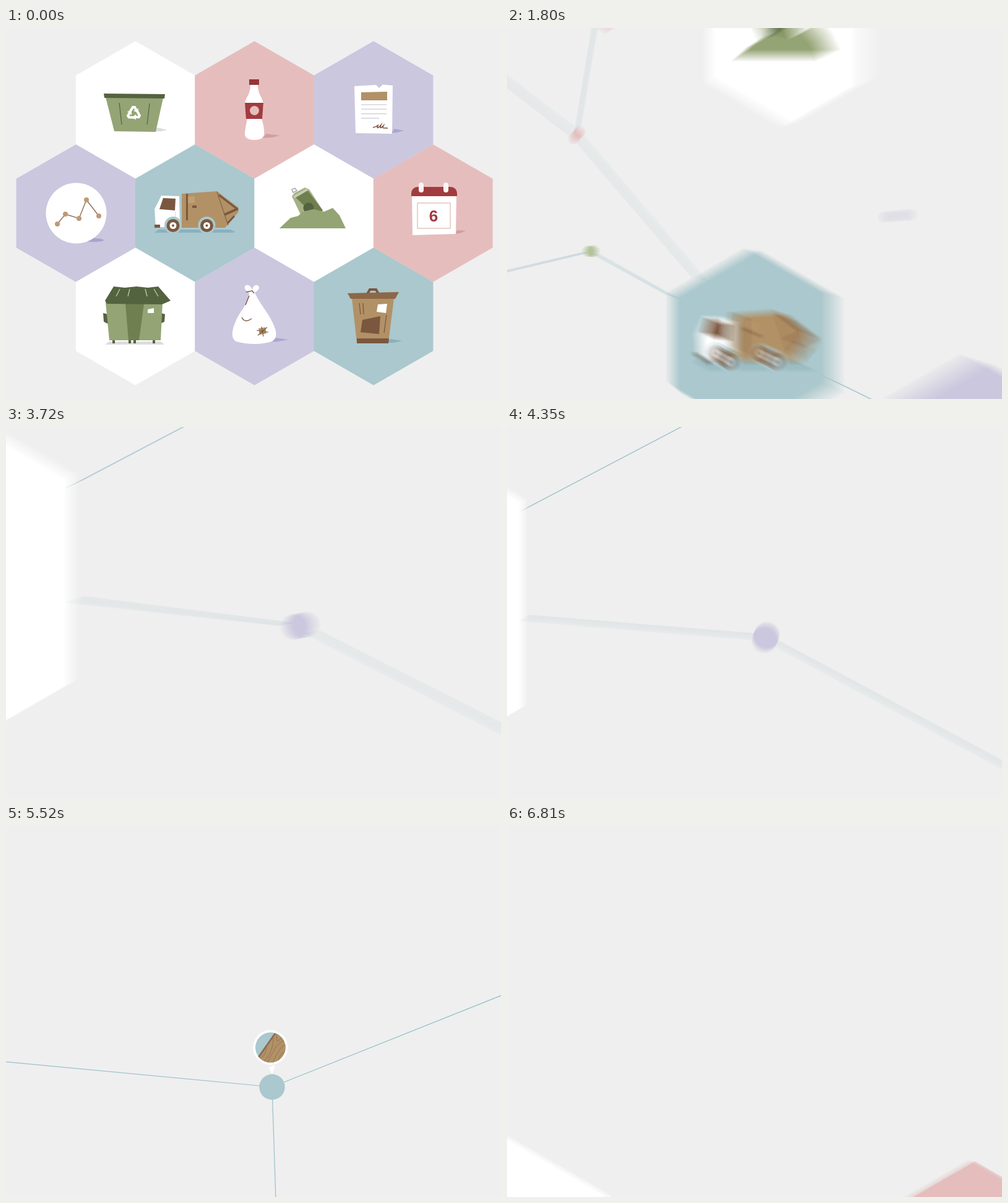
Animation, 800 px wide and 600 px high, one loop 6840 ms. Source, as an HTML page with a canvas:

```html
<!DOCTYPE html>
<html>
<head>
<meta charset="utf-8">
<style>
html, body { margin: 0; width: 100%; height: 100%; overflow: hidden; background: #efefef; }
canvas { display: block; }
</style>
</head>
<body>
<canvas id="stage" width="800" height="600"></canvas>
<script>
const LOOP = 6840, SHUTTER = 30, SAMPLES = 12;
const screen2d = document.getElementById('stage').getContext('2d');
const layer = document.createElement('canvas');
layer.width = 800;
layer.height = 600;
const g = layer.getContext('2d');

const BG = '#efefef', WHITE = '#fff', PINK = '#e6bdbd', LILAC = '#cbc7df', TEAL = '#aac8cd',
  GREEN = '#95a474', MOSS = '#536340', OLIVE = '#6f7f4f', TAN = '#b29167', BROWN = '#7a583f',
  RED = '#a23b3f', LINE = '#98bfc9';

// Drawing helpers
function trace(p) {
  g.beginPath();
  for (let i = 0; i < p.length; i += 2) g.lineTo(p[i], p[i + 1]);
}
function poly(color, ...p) {
  trace(p);
  g.fillStyle = color;
  g.fill();
}
function line(color, width, ...p) {
  trace(p);
  g.strokeStyle = color;
  g.lineWidth = width;
  g.stroke();
}
function disc(color, x, y, r, ry = r) {
  g.beginPath();
  g.ellipse(x, y, r, ry, 0, 0, 7);
  g.fillStyle = color;
  g.fill();
}
function box(color, x, y, w, h, r = 0) {
  g.beginPath();
  g.roundRect(x, y, w, h, r);
  g.fillStyle = color;
  g.fill();
}
function shape(color, d) {
  g.fillStyle = color;
  g.fill(new Path2D(d));
}
function curve(color, width, d) {
  g.strokeStyle = color;
  g.lineWidth = width;
  g.stroke(new Path2D(d));
}
function around(x, y, angle, scale, draw) {
  g.save();
  g.translate(x, y);
  g.rotate(angle);
  g.scale(scale, scale);
  g.translate(-x, -y);
  draw();
  g.restore();
}

// Icons, in the coordinates of the packed grid; w is the idle wobble
function bin() {
  poly('#dcdce0', 238, 167, 245, 161, 261, 165, 250, 167);
  poly(GREEN, 161, 112, 254, 113, 242, 168, 175, 167);
  poly(MOSS, 158, 106, 257, 107, 256, 114, 159, 113);
  line(MOSS, 1.2, 183, 121, 187, 156);
  line(MOSS, 1.2, 232, 122, 228, 156);
  for (let i = 0; i < 3; i++) {
    around(206.5, 138, i * Math.PI * 2 / 3, 1, () => {
      line(WHITE, 4, 200, 136, 205, 128, 208, 128, 210, 132);
      poly(WHITE, 206, 134, 214, 130, 213, 137);
    });
  }
}
function bottle() {
  poly('#cf9f9f', 414, 178, 421, 171, 443, 174, 430, 177);
  shape(WHITE, 'M395 91H407C407 110 415 110 416 124L413 147C416 156 418 165 417 173Q415 181 402 181Q388 181 386 173C386 165 388 156 390 147L386 124C387 110 395 110 395 91Z');
  box('#953539', 393, 83, 16, 9);
  poly(RED, 386, 121, 416, 121, 414, 147, 388, 147);
  disc(PINK, 401.5, 133.5, 7.5);
}
function paper(w) {
  around(594, 170, w * .025, 1, () => {
    poly('#aaa6d0', 622, 170, 628, 163, 643, 166, 632, 169);
    poly(WHITE, 563, 94, 598, 92, 603, 97, 609, 91.5, 625, 93, 624, 171, 565, 170);
    poly(TAN, 574, 104, 616, 103, 616, 117, 574, 117);
    for (let i = 0; i < 4; i++) line('#d5d5dc', 1.6, 574, 124 + i * 7.3, i < 3 ? 615 : 603, 124 + i * 7.3);
    curve('#7a4b35', 1.5, 'M593 161C600 160 603 155 601 158C598 164 603 161 606 157C603 165 608 160 610 158C607 164 612 161 617 162');
  });
}
function chart(w) {
  disc('#a8a4cd', 142, 343, 16, 3);
  disc(WHITE, 113.5, 299.5, 49);
  const dots = [[83, 317], [96, 301], [118, 308], [130, 278], [150, 304]]
    .map(([x, y], i) => [x, y + w * 5 * (i % 2 ? 1 : -1)]);
  line('#8b6a54', 1.4, ...dots.flat());
  for (const [x, y] of dots) disc('#bd9a74', x, y, 4);
}
function truck(w) {
  poly('#8ab0bc', 240, 331, 247, 326, 363, 326, 371, 330, 366, 331);
  g.save();
  g.translate(0, w * 1.5);
  poly(TAN, 284, 268, 341, 264, 375, 290, 376, 297, 354, 323, 284, 323);
  poly(BROWN, 291, 268, 294, 268, 294, 311, 291, 311);
  poly('#c19f74', 294, 273, 305, 272, 305, 283, 294, 283);
  box(BROWN, 301, 287, 7, 4);
  line('#8c6b49', 1.5, 341, 265, 359, 319);
  line(BROWN, 3, 344, 270, 374, 293);
  line(BROWN, 4, 353, 302, 375, 292);
  line(BROWN, 3, 358, 316, 369, 304);
  poly(WHITE, 240, 293, 251, 271, 280, 272, 281, 322, 242, 322);
  poly(BROWN, 254, 275, 274, 276, 273, 295, 248, 293);
  line('#d6d9da', 1, 274, 297, 273, 316);
  box(BROWN, 240, 318, 9, 5);
  g.restore();
  for (const x of [270, 324.5]) {
    disc(TEAL, x, 319, 14);
    disc(BROWN, x, 319.5, 10.5);
    disc(WHITE, x, 319.5, 5.5);
    disc(BROWN, x, 319.5, 2);
  }
}
function can(w) {
  around(490, 298, w * .06, 1, () => {
    curve('#999', 1.3, 'M464 266L462 261L467 259L470 263Z');
    poly('#a4b186', 462, 272, 466, 267, 483, 258, 490, 261, 512, 295, 480, 310);
    poly(OLIVE, 468, 274, 487, 262, 512, 295, 499, 304);
    poly('#c5cdb0', 464, 272, 485, 260, 489, 262, 467, 275);
    disc(MOSS, 489, 291, 8.5);
  });
  poly(GREEN, 442, 324, 460, 307, 472, 304, 480, 297, 497, 293, 514, 297, 528, 291, 539, 303, 549, 324);
}
function calendar(w) {
  around(692, 333, w * .02, 1, () => {
    poly('#cf9f9f', 724, 333, 730, 327, 743, 328, 734, 332);
    poly(WHITE, 656, 270, 728, 270, 727, 333, 657, 335);
    box(RED, 655, 257, 74, 15, [10, 10, 0, 0]);
    for (const x of [667, 707]) box('#faf5f5', x, 250, 8, 16, 4);
    g.strokeStyle = '#dcb6b0';
    g.lineWidth = 1.2;
    g.strokeRect(665, 283, 53, 41);
    g.fillStyle = RED;
    g.font = 'bold 26px "Liberation Sans", Arial, sans-serif';
    g.textAlign = 'center';
    g.fillText('6', 691, 313);
  });
}
function dumpster(w) {
  poly('#dcdce0', 160, 512, 167, 507, 250, 507, 256, 512);
  for (const x of [172, 198, 206, 237]) box(MOSS, x, 503, 4, 7);
  poly(MOSS, 157, 461, 165, 463, 166, 479, 158, 475);
  poly(MOSS, 251, 461, 257, 463, 256, 475, 250, 478);
  poly(GREEN, 161, 444, 253, 444, 250, 505, 167, 505);
  poly(OLIVE, 193, 446, 223, 446, 215, 505, 198, 505);
  poly(WHITE, 229, 455, 239, 453, 239, 461, 229, 461);
  around(212, 446, w * .015, 1, () => {
    poly(MOSS, 160, 441, 174, 418, 192, 420, 211, 418, 229, 420, 246, 418, 266, 441, 252, 447, 163, 446);
    for (const [a, b] of [[184, 178], [200, 197], [225, 228], [239, 246]]) line('#b6c49a', 1.4, a, 422, b, 434);
  });
}
function bag(w) {
  poly('#aaa6d0', 424, 508, 436, 501, 456, 504, 440, 507);
  around(401, 508, w * .02, 1, () => {
    shape(WHITE, 'M393 428C381 421 386 414 392 416Q396 418 398 424C399 416 404 414 408 417Q412 422 402 428C407 440 417 452 427 469C437 487 441 500 430 507Q402 515 372 507C363 502 365 488 371 475C377 459 392 447 393 428Z');
    curve(BROWN, 1.4, 'M388 427L398 425L401 429M393 433L387 448');
    curve(BROWN, 1.4, 'M381 468Q386 478 397 470');
    poly(TAN, 408, 486, 419, 484, 421, 494, 410, 496);
    curve(BROWN, 1.2, 'M405 489L424 492M407 497L422 484M413 483L416 499');
  });
}
function trash(w) {
  poly('#8ab0bc', 612, 509, 622, 503, 640, 506, 627, 509);
  poly(TAN, 559, 437, 627, 437, 618, 509, 567, 509);
  poly(BROWN, 567, 502, 619, 502, 618, 510, 567, 510);
  poly(BROWN, 576, 472, 605, 466, 603, 495, 573, 492);
  poly(WHITE, 601, 447, 616, 446, 614, 461, 599, 459);
  line(BROWN, 1.3, 571, 445, 573, 463);
  line(BROWN, 1.3, 577, 445, 578, 463);
  line(BROWN, 1.3, 615, 464, 611, 493);
  around(593, 437, w * .02, 1, () => {
    line(BROWN, 4, 584, 430, 588, 423, 598, 423, 602, 430);
    poly('#8b6848', 552, 429, 635, 427, 629, 438, 557, 438);
  });
}

// The network: offsets from the truck. Hexes fan out from the packed grid
// unless they have a place of their own.
const HALF = 96.2, ROW = 167, FAN = 3.4;
function hex(color, icon, col, row, x = (col - 2) * HALF * FAN, y = row * ROW * FAN) {
  return { color, icon, packed: [(col - 2) * HALF, row * ROW], spread: [x, y] };
}
function node(color, x, y) {
  return { color, near: 1, packed: [0, 0], spread: [x, y] };
}
const hexes = {
  bin: hex(WHITE, bin, 1, -1, -563, -520),
  bottle: hex(PINK, bottle, 3, -1, -173, -492),
  paper: hex(LILAC, paper, 5, -1, 456, -589),
  chart: hex(LILAC, chart, 0, 0),
  truck: hex(TEAL, truck, 2, 0),
  can: hex(WHITE, can, 4, 0, 41, -371),
  calendar: hex(PINK, calendar, 6, 0, 1023, -695),
  dumpster: hex(WHITE, dumpster, 1, 1),
  bag: hex(LILAC, bag, 3, 1, 272, 133),
  trash: hex(TEAL, trash, 5, 1, 715, -112)
};
const nodes = {
  pink: node(PINK, -211, -228),
  green: node('#b5c398', -194, -87),
  lilac: node(LILAC, 178, -130),
  teal: node(TEAL, 303, -391)
};
const all = { ...hexes, ...nodes };

// Links of each group show from the leg with the same number on
const links = [
  ['pink truck', 'pink bin', 'pink bottle', 'green truck', 'green chart', 'truck bag'],
  [],
  ['can lilac', 'can paper', 'lilac trash'],
  ['teal paper', 'teal calendar', 'teal trash']
].map(group => group.map(pair => pair.split(' ').map(name => all[name])));

// Camera: where the truck stands on the stage, the zoom,
// and how far the nearer plane of nodes has slid
const LEGS = [[700, 1410], [1410, 2490], [2900, 3850], [4300, 5150], [6210, 6820]];
const STOPS = [
  { x: 305.4, y: 299.5, zoom: 1, slide: [0, 0] },
  { x: 160, y: 400, zoom: .624, slide: [0, 0] },
  { x: 954, y: 757, zoom: 3, slide: [-7, -74] },
  { x: -370, y: 1390, zoom: 3, slide: [86, -223] },
  { x: -1670, y: 2120, zoom: 3, slide: [397, -175] },
  { x: 1103, y: 1749, zoom: 2, slide: [397, -175] }
];
const clamp = u => Math.max(0, Math.min(1, u));
const mix = (a, b, u) => a + (b - a) * u;
function ramp(t, a, b) {
  const u = clamp((t - a) / (b - a));
  return u * u * (3 - 2 * u);
}
const travel = (t, pick) => LEGS.reduce((v, leg, i) => mix(v, pick(STOPS[i + 1]), ramp(t, ...leg)), pick(STOPS[0]));

function place(t, zoom) {
  const open = ramp(t, ...LEGS[0]);
  const origin = [travel(t, s => s.x), travel(t, s => s.y)];
  const slide = [0, 1].map(k => travel(t, s => s.slide[k]));
  for (const p of Object.values(all)) {
    p.pos = origin.map((o, k) => o + zoom * (mix(p.packed[k], p.spread[k], open) + (p.near ? slide[k] : 0)));
  }
}

function hexagon(h, s, w) {
  const [x, y] = h.pos;
  if (x < -100 * s || x > 800 + 100 * s || y < -115 * s || y > 600 + 115 * s) return;
  g.save();
  g.translate(x, y);
  g.scale(s, s);
  trace(Array.from({ length: 12 }, (_, i) => 111.3 * Math.sin(Math.floor(i / 2) * Math.PI / 3 + (i % 2) * Math.PI / 2)));
  g.fillStyle = h.color;
  g.fill();
  g.translate(-STOPS[0].x - h.packed[0], -STOPS[0].y - h.packed[1]);
  h.icon(w);
  g.restore();
}

function bubble(t, [x, y]) {
  const u = clamp((t - 5490) / 400) - 1;
  const size = (1 + 2.7 * u ** 3 + 1.7 * u ** 2) * (1 - ramp(t, 6210, 6420));
  if (t < 5490 || size <= 0) return;
  g.save();
  g.translate(x - 431, y - 423);
  around(431, 405, 0, size, () => {
    poly(WHITE, 416, 362, 447, 352, 431, 398);
    disc(WHITE, 423, 265, 86);
    disc(TEAL, 423, 265, 74.5);
    g.save();
    g.beginPath();
    g.arc(423, 265, 74.5, 0, 7);
    g.clip();
    poly(TAN, 455, 180, 520, 180, 520, 350, 380, 350, 360, 312);
    poly('#8a6a4f', 450, 183, 458, 185, 367, 316, 360, 312);
    curve('#70503c', 1.4, 'M437 218C440 255 420 310 389 333M402 265C402 290 390 312 371 318'
      + 'M455 198C451 212 454 222 456 234C465 231 478 222 484 210'
      + 'M408 338C420 312 432 294 445 272C456 252 470 240 490 230'
      + 'M435 340C444 318 454 298 466 280C476 264 486 255 500 251'
      + 'M463 329C465 310 478 292 500 281');
    g.restore();
  });
  g.globalAlpha = ramp(t, 5650, 5900) * (1 - ramp(t, 6210, 6360));
  g.font = 'bold 60.5px Roboto, sans-serif';
  g.textAlign = 'left';
  g.fillStyle = '#f8f8f8';
  g.fillText('WOOD', 529, 285.5);
  g.fillStyle = '#8c8c8c';
  g.fillText('WOOD', 528, 284);
  g.restore();
}

function scene(t) {
  g.fillStyle = BG;
  g.fillRect(0, 0, 800, 600);
  const zoom = travel(t, s => s.zoom);
  const u = clamp(t / 690) * Math.PI;
  const wobble = Math.sin(u * 4) * Math.sin(u);
  place(t, zoom);
  links.forEach((group, i) => {
    if (t > LEGS[i][0]) for (const [a, b] of group) line(LINE, 1.2, ...a.pos, ...b.pos);
  });
  for (const n of Object.values(nodes)) disc(n.color, ...n.pos, zoom * 6.9);
  for (const h of Object.values(hexes)) hexagon(h, zoom, wobble);
  bubble(t, nodes.teal.pos);
}

function frame() {
  const t = performance.now() % LOOP;
  const moving = LEGS.some(([a, b]) => t > a && t < b);
  const count = moving ? SAMPLES : 1;
  for (let i = 0; i < count; i++) {
    scene(moving ? t + (i / (count - 1) - .5) * SHUTTER : t);
    // Running average of the samples gives the motion blur
    screen2d.globalAlpha = 1 / (i + 1);
    screen2d.drawImage(layer, 0, 0);
  }
  requestAnimationFrame(frame);
}
requestAnimationFrame(frame);
</script>
</body>
</html>
```
